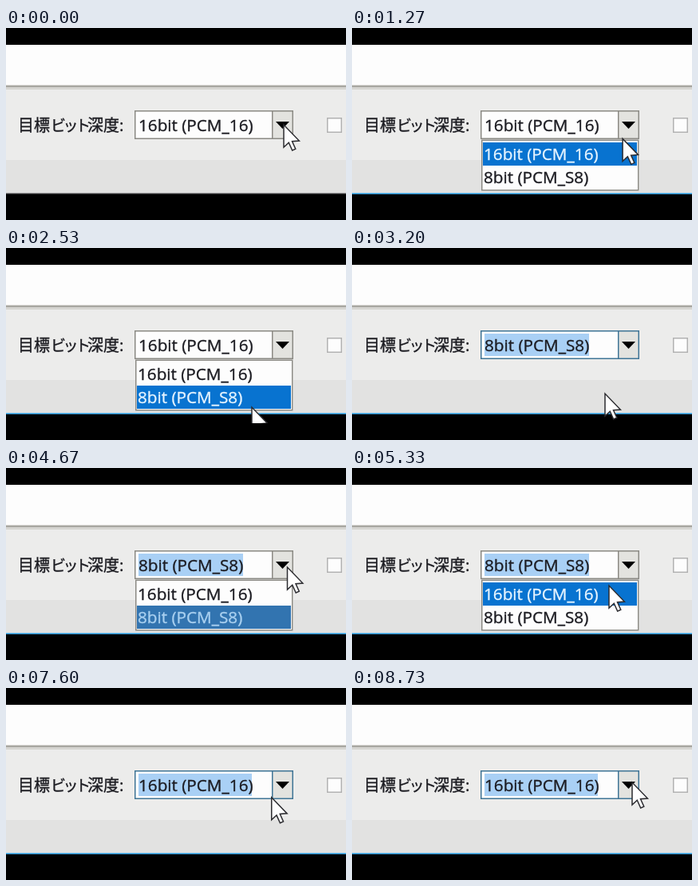
Write an HTML page with a canvas that moves like this. It is 426 px wide and 240 px high and loops after 8990 ms.

```html
<!DOCTYPE html>
<html lang="ja">
<head>
<meta charset="utf-8">
<title>Bit depth selector</title>
<style>
  html, body { margin: 0; width: 100%; height: 100%; overflow: hidden; background: #000; }
  canvas { display: block; width: 426px; height: 240px; }
</style>
</head>
<body>
<canvas id="stage" width="426" height="240"></canvas>
<script>
const ctx = document.getElementById('stage').getContext('2d');
const LOOP = 8990, FPS = 15;
const LATIN = '"Open Sans", "Noto Sans", sans-serif';
const CJK = '"Noto Sans CJK JP", "Noto Sans CJK", sans-serif';
const ITEMS = ['16bit (PCM_16)', '8bit (PCM_S8)'];
const INK = '#1c1c22', PAPER = '#fdfdfd', EDGE = '#8b8a84';
const OPEN_1 = 1120, PICK_1 = 2790, OPEN_2 = 4590, PICK_2 = 7120;
const FADE = 130;

const mix = (a, b, u) => a + (b - a) * u;
const within = (t, a, b) => t >= a && t < b;

function ease(t, from, to) {
  const u = Math.min(1, Math.max(0, (t - from) / (to - from)));
  return u * u * (3 - 2 * u);
}

// The pointer rests between these glides
function pointerAt(t) {
  let x = 348, y = 121;
  const glide = (from, to, toX, toY) => {
    const u = ease(t, from, to);
    x = mix(x, toX, u);
    y = mix(y, toY, u);
  };
  glide(OPEN_1, 1600, 308, 199);
  glide(PICK_1, 3130, 317, 182);
  glide(3400, 3930, 352.5, 124);
  glide(5070, 5330, 322, 147);
  glide(5500, 5930, 317, 153);
  glide(PICK_2, 8130, 351, 118);
  return [x, y];
}

function stateAt(t, pointerY) {
  const opened = t < OPEN_2 ? OPEN_1 : OPEN_2;
  const open = within(t, OPEN_1, PICK_1) || within(t, OPEN_2, PICK_2);
  const value = within(t, PICK_1, PICK_2) ? 1 : 0;
  const hover = pointerY < 139 ? value : pointerY < 172 ? 0 : 1;
  return {
    value, open, hover,
    selected: t >= PICK_1,
    active: t >= OPEN_1,
    fading: t < opened + FADE,
    focus: t >= PICK_1 && !open
  };
}

function box(x, y, w, h, color) {
  ctx.fillStyle = color;
  ctx.fillRect(x, y, w, h);
}

function frame(x, y, w, h, edge, fill = PAPER, line = 1.5) {
  box(x, y, w, h, fill);
  ctx.strokeStyle = edge;
  ctx.lineWidth = line;
  ctx.strokeRect(x + line / 2, y + line / 2, w - line, h - line);
}

// A hairline stroke gives the text its slightly heavy weight
function text(str, x, y, color = INK, size = 20.7, family = LATIN, spacing = 0) {
  ctx.font = `${size}px ${family}`;
  ctx.letterSpacing = `${spacing}px`;
  ctx.fillStyle = ctx.strokeStyle = color;
  ctx.lineWidth = 0.35;
  ctx.fillText(str, x, y);
  ctx.strokeText(str, x, y);
}

function poly(points, x, y, scale = 1) {
  ctx.beginPath();
  for (const [px, py] of points) ctx.lineTo(x + px * scale, y + py * scale);
  ctx.closePath();
}

function drawWindow(active) {
  box(0, 0, 426, 240, '#000');
  box(0, 21, 426, 51, PAPER);
  box(0, 71, 426, 6, '#d6d5d1');
  box(0, 72, 426, 2, '#a8a7a1');
  box(0, 77, 426, 88, '#ececeb');
  box(0, 165, 426, 41, '#e2e2e1');
  box(0, 206, 426, 1, active ? '#62bdf0' : '#8a8a8c');
  box(0, 207, 426, 1, active ? '#2a7fb5' : '#2c2c2e');

  text('目標', 15, 129, INK, 20, CJK);
  text('ビット', 56, 129, INK, 19, CJK, -3.5);
  text('深度', 102, 129, INK, 20, CJK);
  text(':', 142, 129);
  frame(402, 112, 19, 19, '#b2b2b2');
}

function drawCombo(s) {
  const edge = s.focus ? '#3f7596' : EDGE;
  frame(161, 103, 199, 36, edge);
  frame(333, 103, 27, 36, edge, '#e3e3df');
  if (s.selected) box(166, 107, s.value ? 131 : 142, 28, '#a9d0f5');
  text(ITEMS[s.value], 166, 129);
  poly([[0, 0], [17, 0], [8.5, 9]], 338, 117);
  ctx.fillStyle = '#000';
  ctx.fill();
}

function drawPopup(s) {
  frame(162, 139.5, 197.5, 64, EDGE);
  ITEMS.forEach((label, i) => {
    const on = i === s.hover, y = 143 + i * 29;
    if (on) box(164, y, 193, 29, s.fading ? '#3274b0' : '#0873d0');
    text(label, 165, y + 22, !on ? INK : s.fading ? '#a9d0f0' : '#e6f4ff');
  });
}

function drawPointer(x, y) {
  const arrow = [[0, 0], [0, 16.5], [3.7, 13.1], [6.3, 18.8], [8.7, 17.7], [6.2, 12.2], [11.4, 11.8]];
  ctx.save();
  ctx.beginPath();
  ctx.rect(0, 21, 426, 198);
  ctx.clip();
  poly(arrow, x, y, 1.7);
  ctx.fillStyle = '#fff';
  ctx.fill();
  ctx.strokeStyle = '#2c2c30';
  ctx.lineWidth = 1.5;
  ctx.stroke();
  ctx.restore();
}

function draw(now) {
  const t = Math.floor((now % LOOP) * FPS / 1000 + 0.1) * 1000 / FPS;
  const [x, y] = pointerAt(t);
  const s = stateAt(t, y);
  drawWindow(s.active);
  drawCombo(s);
  if (s.open) drawPopup(s);
  drawPointer(x, y);
}

const start = performance.now();
function tick() {
  draw(performance.now() - start);
  requestAnimationFrame(tick);
}
tick();
</script>
</body>
</html>
```
